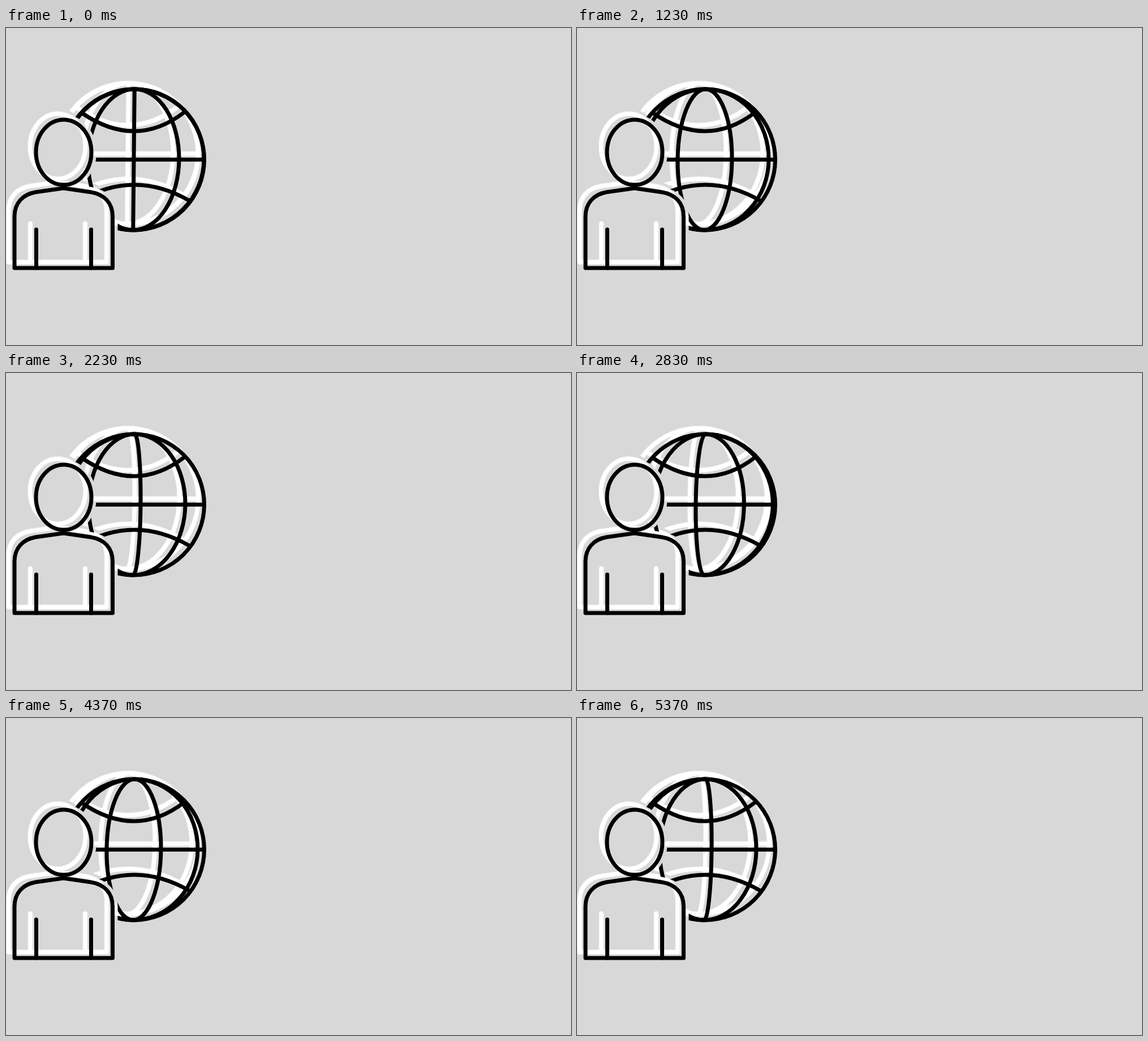
Recreate the animation shown at these times as an HTML page with a canvas. Size 999 by 560 pixels, loop 5.41 s.

```html
<!DOCTYPE html>
<html lang="en">
<head>
<meta charset="utf-8">
<title>User and turning globe</title>
<style>
html, body { margin: 0; width: 100%; height: 100%; overflow: hidden; background: #d8d8d8; }
canvas { display: block; }
</style>
</head>
<body>
<canvas id="stage" width="999" height="560"></canvas>
<script>
const LOOP = 5410, STEP = 50, STEPS = 9;
const CX = 226, CY = 232.5, R = 124.5;
const stage = document.getElementById('stage').getContext('2d');
const layer = new OffscreenCanvas(400, 480).getContext('2d');

const body = new Path2D('M15 424V333C15 309 30 294 52 290L101.5 283L150 290C174 294 188.5 309 188.5 333V424Z');
const arms = new Path2D('M53.5 356V424M150.5 356V424');
const head = new Path2D();
head.ellipse(102, 219.5, 49, 57.5, 0, 0, 7);
const globe = new Path2D('M134 150Q229 215 315 149M130 305Q227 249 324 305M104 232.5H354');
globe.moveTo(CX + R, CY);
globe.arc(CX, CY, R, 0, 7);

// Horizontal place of one meridian as it crosses the globe: [step, offset]
const track = [[0, 124], [6, 113], [8, 91], [9, 80], [15, 48], [17, 12], [18, 0],
  [24, -48], [26, -80], [27, -81], [33, -111], [36, -124]];

function offsetAt(step) {
  const i = Math.max(1, track.findIndex(key => key[0] >= step));
  const [s0, x0] = track[i - 1], [s1, x1] = track[i];
  return x0 + (x1 - x0) * (step - s0) / (s1 - s0);
}

function meridian(x) {
  const c = layer;
  c.save();
  c.transform(1, 0, -0.01, 1, CX, CY);
  c.beginPath();
  c.ellipse(0, 0, Math.abs(x), R, 0, -Math.PI / 2, Math.PI / 2, x < 0);
  c.stroke();
  c.restore();
}

function drawIcon(color, width, dx, dy, step) {
  const c = layer;
  c.clearRect(0, 0, 400, 480);
  c.strokeStyle = color;
  c.lineWidth = width;
  c.lineJoin = 'round';
  c.lineCap = 'butt';
  c.stroke(globe);
  for (let s = step; s <= 36; s += STEPS) meridian(offsetAt(s));

  // Clear a margin around the person
  c.globalCompositeOperation = 'destination-out';
  c.lineWidth = 18;
  for (const part of [head, body]) {
    c.fill(part);
    c.stroke(part);
  }
  c.globalCompositeOperation = 'source-over';

  c.lineWidth = width;
  c.lineCap = 'round';
  for (const part of [head, body, arms]) c.stroke(part);
  stage.drawImage(c.canvas, dx, dy);
}

function frame(now) {
  const step = Math.floor(now % LOOP / STEP) % STEPS;
  stage.fillStyle = '#d8d8d8';
  stage.fillRect(0, 0, 999, 560);
  drawIcon('#fff', 8, -10.5, -10.5, step);
  drawIcon('#000', 7, 0, 0, step);
}

const start = performance.now();
function tick() {
  frame(performance.now() - start);
  requestAnimationFrame(tick);
}
tick();
</script>
</body>
</html>
```
